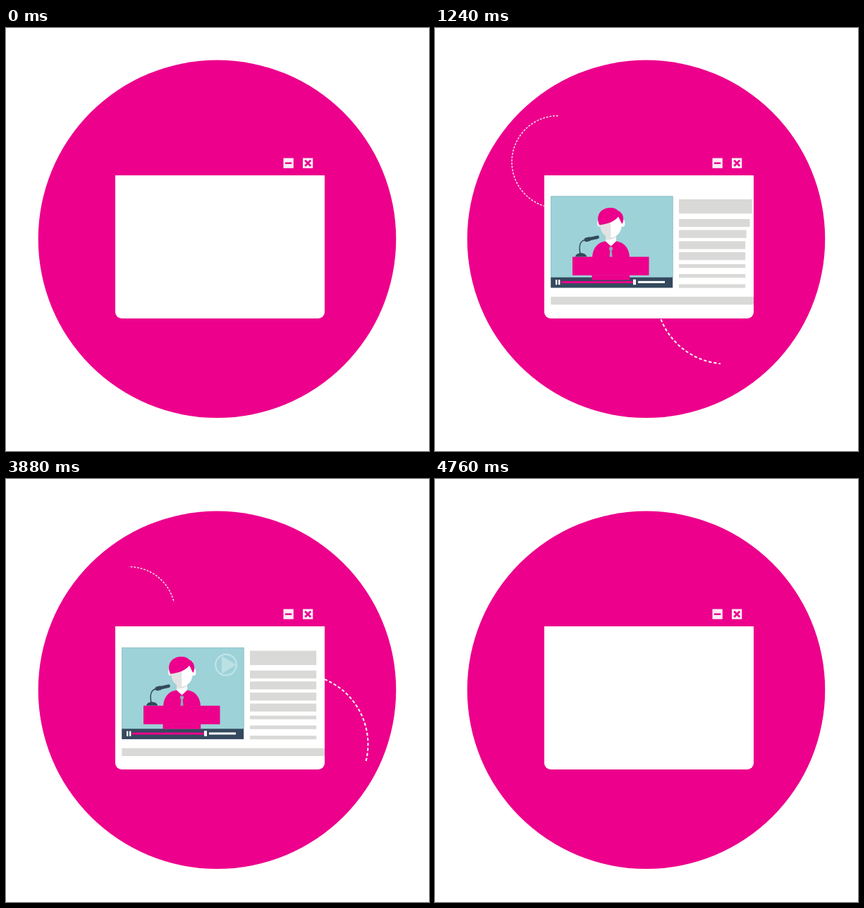
Animation of 600 by 600 pixels, one loop 4.8 s. Source, as an HTML page with a canvas:

```html
<!DOCTYPE html>
<html lang="en">
<head>
<meta charset="utf-8">
<title>Webinar window</title>
<style>
  html, body { margin: 0; width: 100%; height: 100%; overflow: hidden; background: #fff; }
  canvas { display: block; width: 600px; height: 600px; }
</style>
</head>
<body>
<canvas id="stage" width="600" height="600"></canvas>
<script>
const ctx = document.getElementById('stage').getContext('2d');

const LOOP = 4800, STEP = 40;
const PINK = '#ec008c', TEAL = '#9cd2d8', NAVY = '#34495e', GREY = '#d9d9d8', WHITE = '#fff';

// Top and height of each line in the side column
const LINES = [[243, 20.3], [271, 11.2], [286.6, 11.2], [302.4, 11.2],
               [318, 11.2], [335, 5.2], [349, 5.2], [363.5, 5.2]];

const BACK = 1.70158;
const backIn = x => (BACK + 1) * x ** 3 - BACK * x * x;
const backOut = x => 1 - backIn(1 - x);
const progress = (t, start, length) => Math.min(1, Math.max(0, (t - start) / length));

function rect(color, x, y, w, h) {
  ctx.fillStyle = color;
  ctx.fillRect(x, y, w, h);
}

function shape(color, path) {
  ctx.fillStyle = color;
  ctx.fill(new Path2D(path));
}

function line(color, width, path) {
  ctx.strokeStyle = color;
  ctx.lineWidth = width;
  ctx.stroke(new Path2D(path));
}

function ellipse(color, x, y, rx, ry) {
  ctx.fillStyle = color;
  ctx.beginPath();
  ctx.ellipse(x, y, rx, ry, 0, 0, Math.PI * 2);
  ctx.fill();
}

// Dashed ring that draws itself from the top, then erases from the same end
function ring(t, x, y, r) {
  const head = progress(t, 0, 2550), tail = progress(t, 1700, 3060);
  if (head <= tail) return;
  const angle = part => -Math.PI / 2 - part * Math.PI * 2;
  ctx.save();
  ctx.strokeStyle = WHITE;
  ctx.lineWidth = r * 0.02;
  ctx.setLineDash([r * 0.043, r * 0.029]);
  ctx.beginPath();
  ctx.arc(x, y, r, angle(tail), angle(head), true);
  ctx.stroke();
  ctx.restore();
}

function windowFrame() {
  rect(PINK, 155, 174.5, 297, 35);
  shape(WHITE, 'M155 209H452V403a9 9 0 0 1-9 9H164a9 9 0 0 1-9-9Z');
  rect('#fdeef7', 393.5, 184.5, 14.3, 14.3);
  rect('#fdeef7', 421, 184.5, 14.3, 14.3);
  rect(PINK, 396, 190.5, 9.2, 2.5);
  line(PINK, 2.8, 'M424.2 187.7l8 8M432.2 187.7l-8 8');
}

function player() {
  rect(TEAL, 164.3, 238.5, 173.2, 116);
  line('#7fb0ba', 0.6, 'M164.5 354V238.7H337.3V354');
  rect(NAVY, 164.2, 353.7, 173, 14.8);
  rect(WHITE, 171, 357, 2.4, 7.2);
  rect(WHITE, 175, 357, 2.4, 7.2);
  rect(PINK, 179, 359, 102, 3);
  rect(WHITE, 281, 356.6, 4, 7.6);
  rect(WHITE, 288, 358.9, 38, 3);
}

function speaker() {
  shape(PINK, 'M223 323C223 308 232 300 242 299H257C267 300 276 308 276 323Z');
  shape(WHITE, 'M242 288H257V299L249.5 306L242 299Z');
  shape('#e2e2e2', 'M242 288H249.5L257 293C253 297 246 297 242 297Z');

  ellipse('#e9e9e9', 232.6, 273.5, 2.8, 5);
  ellipse(WHITE, 266.6, 273.5, 2.8, 5);
  shape('#e2e2e2', 'M249.5 258V294C239 293 234 284 234 274V258Z');
  shape(WHITE, 'M249.2 258V294C260 293 265 284 265 274V258Z');
  shape(PINK, 'M233.6 276C228 266 232 252 248 251.4C254 251.2 258 253 260 256' +
              'C267 258 269 268 265.5 274.5C263 271 262 267 260 264C255 271 246 274 233.6 276Z');

  ellipse('#8fabb8', 249.5, 309.5, 2.6, 2.8);
  shape('#8fabb8', 'M248.4 311H250.6L251.6 321.5H247.4Z');

  rect(PINK, 195, 321, 108.5, 26.3);
  rect(PINK, 222.5, 347, 53.7, 7);

  shape(NAVY, 'M199 321C200 314 214 314 215.2 321Z');
  ctx.lineCap = 'round';
  line(NAVY, 1.6, 'M206 317C203.5 304 206 298.5 213 297');
  line(NAVY, 4.6, 'M230.6 293.1L219 295.6');
  line(NAVY, 5.8, 'M218.5 295.8L214.6 296.8');
  ctx.lineCap = 'butt';
}

function playButton(scale) {
  if (scale <= 0) return;
  ctx.save();
  ctx.translate(312, 263);
  ctx.scale(scale, scale);
  line('#bfe3e7', 2.4, 'M14.8 0A14.8 14.8 0 1 1-14.8 0A14.8 14.8 0 1 1 14.8 0Z');
  shape('#bce1e5', 'M-6-12.5L14.5 0L-6 12.5Z');
  ctx.restore();
}

function content(t) {
  ctx.save();
  ctx.beginPath();
  ctx.rect(155, 209, 297, 203);
  ctx.clip();
  ctx.translate(0, -200 * backIn(progress(t, 3840, 920)));

  const dropIn = (start, length, distance, draw) => {
    const p = progress(t, start, length);
    if (p <= 0) return;
    ctx.save();
    ctx.translate(0, distance * (backOut(p) - 1));
    draw();
    ctx.restore();
  };
  const grow = (start, length, x, y, w, h) =>
    rect(GREY, x, y, w * backOut(progress(t, start, length)), h);

  grow(320, 470, 164.3, 381.2, 288, 11.2);
  LINES.forEach(([y, h], i) => grow(1006 - i * 62, 400, 346, y, 94.2, h));
  dropIn(0, 388, 300, player);
  dropIn(885, 400, 200, speaker);
  playButton(backOut(progress(t, 1300, 400)));
  ctx.restore();
}

function frame(now) {
  const t = Math.floor((now % LOOP) / STEP) * STEP;
  rect(WHITE, 0, 0, 600, 600);
  ellipse(PINK, 299.5, 299.3, 253.8, 253.8);
  ring(t, 174.5, 190, 65.5);
  ring(t, 413.5, 376.5, 100);
  windowFrame();
  content(t);
}

const origin = performance.now();
function tick() {
  frame(performance.now() - origin);
  requestAnimationFrame(tick);
}
tick();
</script>
</body>
</html>
```
